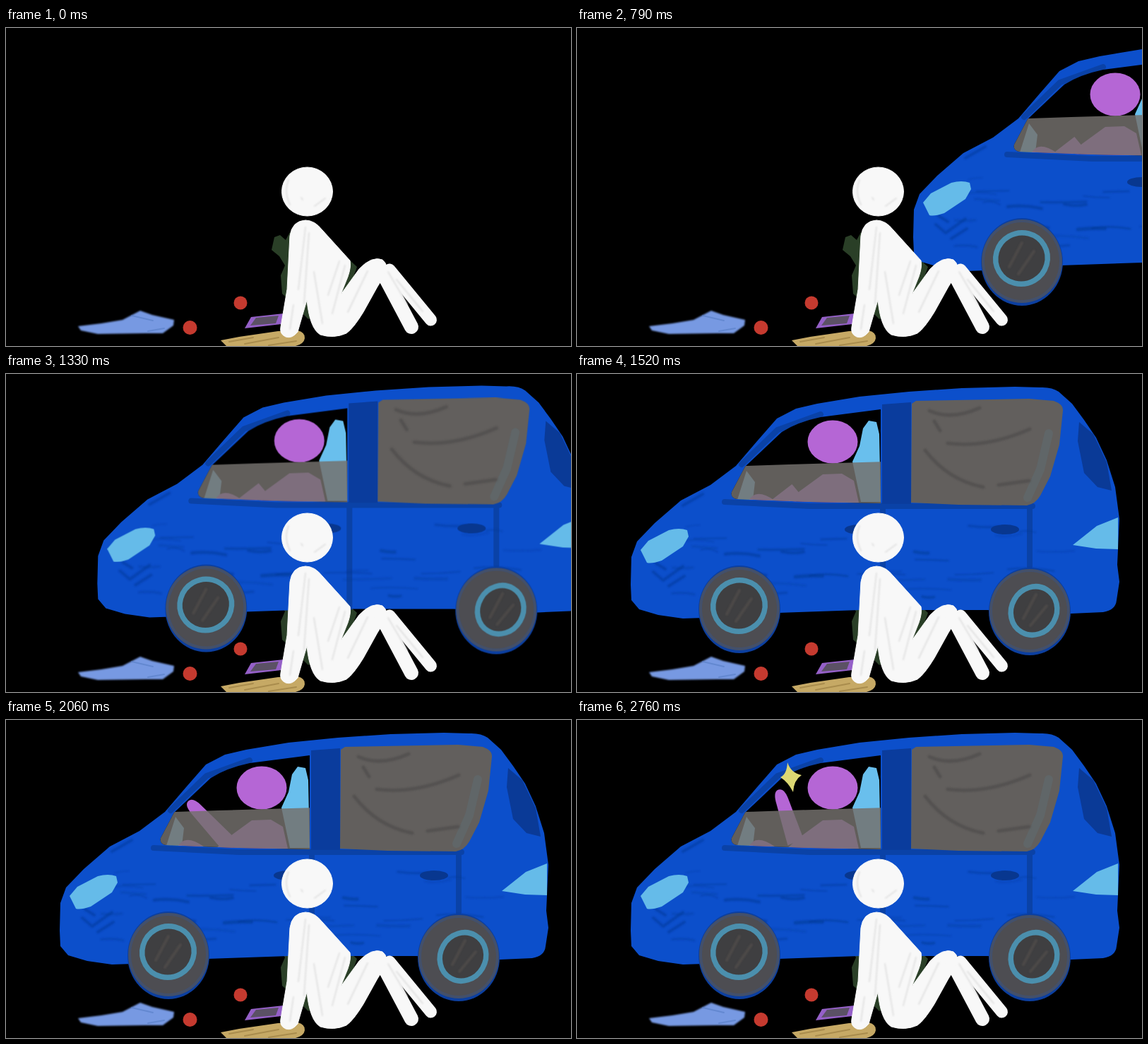
An HTML page that plays this animation: 800 px wide and 450 px high, repeating every 2.79 s.

```html
<!DOCTYPE html>
<html>
<head>
<meta charset="utf-8">
<style>
  html, body { margin: 0; height: 100%; overflow: hidden; background: #000; }
  svg { display: block; width: 800px; height: 450px; }
  .brush { fill: none; stroke-linecap: round; stroke-linejoin: round; }
</style>
</head>
<body>
<svg viewBox="0 0 800 450">
  <defs>
    <clipPath id="cab"><path d="M430 50V183L330 181 226 177Q217 175 219 167L238 131 290 82Q312 68 345 61Z"/></clipPath>
    <filter id="soft" x="-20%" y="-50%" width="140%" height="200%"><feGaussianBlur stdDeviation="1.2"/></filter>
    <g id="tyre">
      <ellipse cy="1" rx="58" ry="62" fill="#0c3f9f"/>
      <ellipse rx="57" ry="59" fill="#43506b"/>
      <ellipse rx="53" ry="55" fill="#4d4d52"/>
    </g>
  </defs>

  <path fill="#2a3f27" d="M376 314 380 296 388 293 396 300 402 289 440 300 484 326 497 338 490 358 470 385 428 412 402 386 391 376 389 350 395 336 387 323Z"/>

  <g id="van">
    <path fill="#0c4fcb" d="M76 298 77 320 88 333 115 341 150 346 180 345 285 338 400 334 580 334 700 339 745 337Q763 334 764 320L768 294 765 270 768 205 762 160 750 122 735 90 718 65 701 42 682 25Q672 18 655 19L620 18 545 20 470 25 400 32 340 42 310 49 283 63 255 95 225 130 189 157 147 179 110 211 85 237 77 259Z"/>
    <path fill="#0a3c9d" d="M432 43 473 40V184H432Z"/>
    <path class="brush" stroke="#0a3f9f" stroke-width="8" d="M209 181 330 187H645M233 128 284 79 345 57M433 186V332M641 186V272" opacity=".8"/>
    <path fill="#0a3a97" d="M711 68 731 85 750 125 757 165 737 160 718 140 709 95Z"/>
    <g id="paint" class="brush" stroke="#083a97" filter="url(#soft)"></g>
    <g fill="#08378f"><ellipse cx="400" cy="220" rx="21" ry="7"/><ellipse cx="606" cy="220" rx="20" ry="7"/></g>
    <g fill="#65bbe9">
      <path d="M90 249 101 236 130 221Q145 217 156 221L158 230 150 244 120 264Q105 269 99 267Z"/>
      <path d="M702 242 736 215 766 203V248L735 247Z"/>
    </g>

    <path fill="#625f5d" d="M474 42 480 38 640 35 675 38Q689 43 688 52L683 100 670 145 656 172Q649 184 637 186L540 185 473 182Z"/>
    <path class="brush" stroke="#5d7078" stroke-width="12" opacity=".4" d="M668 84 656 135 638 175"/>
    <g class="brush" stroke="#4c4a49" stroke-width="5" opacity=".6" filter="url(#soft)">
      <path d="M499 52Q530 66 570 48M493 108Q525 150 575 160M525 98Q580 105 641 78M597 157 640 151M506 67 514 80"/>
    </g>

    <g clip-path="url(#cab)">
      <path d="M200 40H440V190H200Z"/>
      <path fill="#69bfed" d="M405 77 413 66 424 68 428 85 430 181H402L390 124 400 102ZM240 137 252 153 249 178H227Z"/>
      <g fill="#b566d5">
        <ellipse cx="362" cy="96" rx="35.500" ry="30.500"/>
        <path d="M296 183 315 166 348 142 375 141 392 151 399 182ZM243 180Q252 160 280 179Z"/>
        <g id="arm"><path d="M-6 -12 58 -9Q73 -8 73 0T58 9L-4 12Z"/></g>
      </g>
      <path fill="#74706d" opacity=".84" d="M200 131 240 130 300 128 435 124V190H200Z"/>
    </g>
    <path id="star" fill="#dcd873" d="M-4-21Q1-6 16-3 5 4 4 21-3 7-14 0-5-4-4-21Z"/>

    <use href="#tyre" x="230" y="332"/>
    <use href="#tyre" x="641" y="335"/>
    <g fill="#3f3f41" stroke="#4b8fad" stroke-width="7.500">
      <ellipse cx="229.500" cy="328" rx="37" ry="36" transform="rotate(-30 229.500 328)"/>
      <ellipse cx="647" cy="335" rx="32" ry="35" transform="rotate(30 647 335)"/>
    </g>
    <path class="brush" stroke="#56514e" stroke-width="4" opacity=".6" filter="url(#soft)" d="M212 340 230 306M225 350 247 318M632 346 650 312M642 356 665 328"/>
  </g>

  <path fill="#7799e2" filter="url(#soft)" d="M102 422 135 418 165 413 190 400 207 406 238 413 237 421 222 432 198 432 130 433 106 428Z"/>
  <path class="brush" stroke="#587dc5" stroke-width="2" opacity=".6" d="M178 407 208 414M201 429 224 425"/>
  <g fill="#c53a2f"><circle cx="260.500" cy="424" r="10"/><circle cx="332" cy="389" r="9.500"/></g>
  <path fill="#9560c8" d="M347 409 393 404 390 419 338 425Z"/>
  <path fill="#5b5165" d="M354 410 386 407 382 418 346 421Z"/>
  <path fill="#c6a965" d="M304 442 330 437 385 429 413 428Q424 431 423 439T410 450H312Z"/>
  <path class="brush" stroke="#9d8043" stroke-width="2" opacity=".7" d="M316 444 350 438M338 447 386 438M372 449 411 443"/>

  <g fill="#f8f8f8" stroke="#f8f8f8" stroke-linecap="round" stroke-linejoin="round">
    <ellipse cx="426.500" cy="231.500" rx="36" ry="34.500"/>
    <path d="M402 294Q405 273 424 272 437 272 448 286L487 329Q489 338 484 352L474 377 500 341Q518 322 533 328 543 336 536 350L526 366 506 402Q492 425 482 432 464 440 445 434 430 425 426 385L413 430Q405 440 396 437 387 433 389 423L398 370Z"/>
    <path fill="none" stroke-width="20" d="M530 340 574 423"/>
    <path fill="none" stroke-width="17" d="M543 342 601.500 413"/>
  </g>
  <g class="brush" stroke="#d3d3d3" stroke-width="2" opacity=".6" filter="url(#soft)">
    <path d="M424 282 414 370M429 290 422 390M436 345 448 418M472 330 456 378M480 336 462 404M512 344 484 402M541 345 568 391M553 356 590 401M407 392 402 426M418 240 420 243M400 215Q393 231 402 250M437 252 452 241"/>
  </g>
</svg>
<script>
const LOOP = 2790;
const $ = id => document.getElementById(id);

// Loose dry-brush strokes on the bodywork
let seed = 7;
const rand = () => (seed = seed * 16807 % 2147483647) / 2147483647;
let strokes = '';
for (let i = 0; i < 34; i++) {
  const x = 135 + rand() * 520, y = 200 + rand() * 120, w = 15 + rand() * 55;
  strokes += `<path d="M${x} ${y}q${w / 2} ${rand() * 8 - 4} ${w} ${rand() * 6 - 3}"
    stroke-width="${1 + rand() * 4}" opacity="${.2 + rand() * .35}"/>`;
}
strokes += '<path stroke-width="4" opacity=".5" d="M108 280 122 292 150 272M112 268 125 276M130 300 152 286M150 186 178 170"/>';
$('paint').innerHTML = strokes;

// Interpolates linearly through [time, value] pairs
function along(keys, t) {
  const next = keys.findIndex(k => k[0] > t);
  if (next < 0) return keys[keys.length - 1][1];
  if (next === 0) return keys[0][1];
  const [t0, a] = keys[next - 1], [t1, b] = keys[next];
  return a + (b - a) * (t - t0) / (t1 - t0);
}

const drive = [[180, 740], [450, 650], [580, 650], [730, 490], [790, 400],
               [850, 400], [1090, 227], [1300, 70], [1430, 0]];
const lift = [[200, -2], [1300, -2], [1430, 0]];
const raise = [[1700, 145], [2060, 227], [2400, 252]];
const twinkle = [[2400, 0], [2520, 1]];

const start = performance.now();
function draw() {
  const t = (performance.now() - start) % LOOP;
  $('van').setAttribute('transform', `translate(${along(drive, t)} ${along(lift, t)})`);
  $('arm').setAttribute('transform', `translate(308 168) rotate(${along(raise, t)})`);
  $('star').setAttribute('transform', `translate(302 81) scale(${along(twinkle, t)})`);
  requestAnimationFrame(draw);
}
draw();
</script>
</body>
</html>
```
